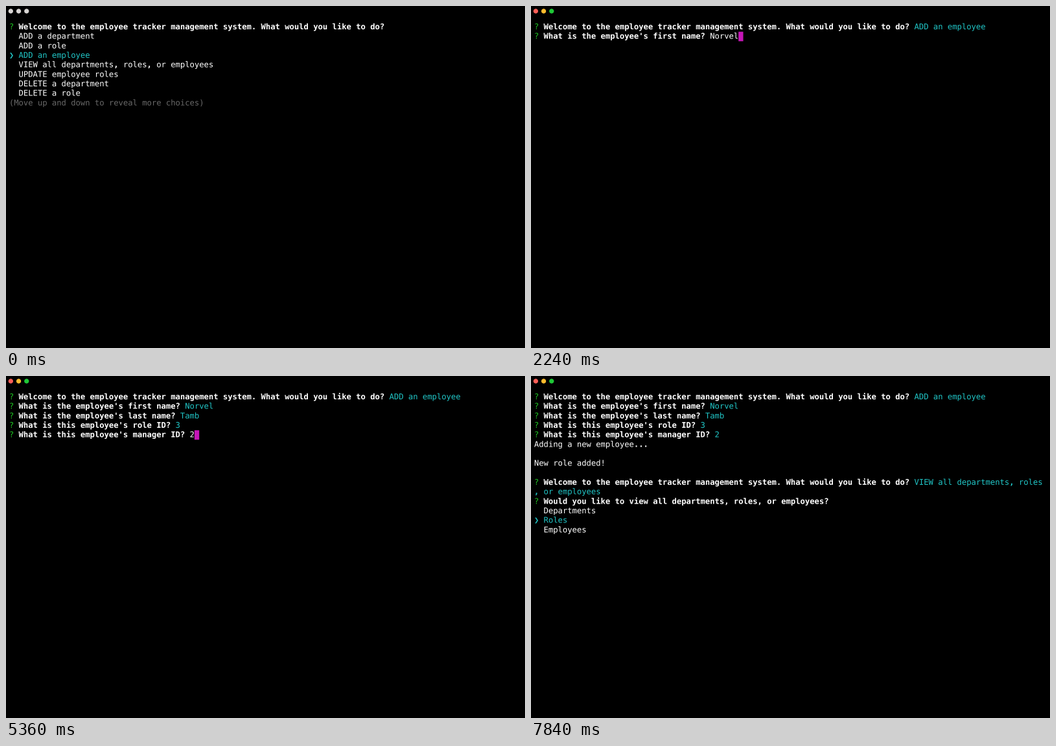
These frames come from a looping animation (801x528 px, 8000 ms). An HTML page with a canvas:

```html
<!DOCTYPE html>
<html lang="en">
<head>
<meta charset="utf-8">
<title>Employee tracker terminal</title>
<style>
  html, body { margin: 0; width: 100%; height: 100%; overflow: hidden; background: #000; }
  canvas { display: block; width: 801px; height: 528px; }
</style>
</head>
<body>
<canvas id="terminal" width="1602" height="1056"></canvas>
<script>
const LOOP = 8000;
const FOCUS_TIME = 80;
const COLUMNS = 107;

// Window units; the window is shown at 11/18 size on a double-density canvas.
const SCALE = 2 * 11 / 18;
const LEFT = 8, TOP = 41, CELL = 12, ROW = 24, BASELINE = 18;
const FONT = '20px "DejaVu Sans Mono", "Liberation Mono", monospace';

const COLORS = {
  text: '#fff', bold: '#fff', mark: '#1dc121', pick: '#20c5c6', hint: '#686868',
  cursor: '#c616b7'
};
const FOCUSED = ['#ff5f57', '#febc2e', '#1fc937'];
const UNFOCUSED = Array(3).fill('#d8d5d3');

const WELCOME = 'Welcome to the employee tracker management system. What would you like to do?';
const VIEW_QUESTION = 'Would you like to view all departments, roles, or employees?';
const ACTIONS = [
  'ADD a department', 'ADD a role', 'ADD an employee',
  'VIEW all departments, roles, or employees', 'UPDATE employee roles',
  'DELETE a department', 'DELETE a role'
];
const TABLES = ['Departments', 'Roles', 'Employees'];
const FIELDS = [
  ["What is the employee's first name?", 'Norvel'],
  ["What is the employee's last name?", 'Tamb'],
  ["What is this employee's role ID?", '3'],
  ["What is this employee's manager ID?", '2']
];

// A line is a list of [style, text] runs.
const plain = text => [['text', text]];
const ask = (question, style = 'text', answer = '') =>
  [['mark', '? '], ['bold', question + ' '], [style, answer]];

function menu(question, items, selected, { hint = false, more = false } = {}) {
  const lines = [ask(question, 'hint', hint ? '(Use arrow keys)' : '')];
  items.forEach((item, i) =>
    lines.push(i === selected ? [['pick', '❯ ' + item]] : plain('  ' + item)));
  if (more) lines.push([['hint', '(Move up and down to reveal more choices)']]);
  return lines;
}

const mainMenu = (selected, hint) => menu(WELCOME, ACTIONS, selected, { hint, more: true });
const answered = count => [
  ask(WELCOME, 'pick', ACTIONS[2]),
  ...FIELDS.slice(0, count).map(([question, answer]) => ask(question, 'pick', answer))
];
const saved = () => [
  ...answered(FIELDS.length),
  plain('Adding a new employee...'), [], plain('New role added!'), []
];

// Screens
const typing = (field, length) => ({
  lines: [...answered(field), ask(FIELDS[field][0], 'text', FIELDS[field][1].slice(0, length))],
  cursor: true
});
const choosing = (selected, hint) => ({ lines: [...saved(), ...mainMenu(selected, hint)] });
function viewing(selected, hint) {
  const room = COLUMNS - WELCOME.length - 3;
  const choice = ACTIONS[3];
  return {
    lines: [
      ...saved(),
      ask(WELCOME, 'pick', choice.slice(0, room)),
      [['pick', choice.slice(room)]],
      ...menu(VIEW_QUESTION, TABLES, selected, { hint })
    ]
  };
}

const STEPS = [
  [0, { lines: mainMenu(2) }],
  [640, typing(0, 0)],
  [1600, typing(0, 1)],
  [1760, typing(0, 2)],
  [1920, typing(0, 3)],
  [2080, typing(0, 5)],
  [2240, typing(0, 6)],
  [2480, typing(1, 0)],
  [2720, typing(1, 1)],
  [2880, typing(1, 2)],
  [3040, typing(1, 4)],
  [3360, typing(2, 0)],
  [4320, typing(2, 1)],
  [4480, typing(3, 0)],
  [5360, typing(3, 1)],
  [5520, choosing(0, true)],
  [6480, choosing(1)],
  [6720, choosing(2)],
  [6880, choosing(3)],
  [7120, viewing(0, true)],
  [7840, viewing(1)]
];

const canvas = document.getElementById('terminal');
const ctx = canvas.getContext('2d', { alpha: false });
ctx.scale(SCALE, SCALE);
ctx.textRendering = 'geometricPrecision';

function drawDots(colors) {
  colors.forEach((color, i) => {
    ctx.fillStyle = color;
    ctx.beginPath();
    ctx.arc(12 + 20 * i, 13, 6, 0, 2 * Math.PI);
    ctx.fill();
  });
}

// Draws one line on the character grid and returns the column after it.
function drawLine(runs, top) {
  let column = 0;
  for (const [style, text] of runs) {
    ctx.fillStyle = COLORS[style];
    for (const char of text) {
      // Full stops and commas are heavy in every weight.
      const heavy = style === 'bold' || '.,'.includes(char);
      ctx.font = heavy ? 'bold ' + FONT : FONT;
      ctx.fillText(char, LEFT + CELL * column++, top + BASELINE);
    }
  }
  return column;
}

function draw({ lines, cursor }, focused) {
  ctx.fillStyle = '#000';
  ctx.fillRect(0, 0, canvas.width, canvas.height);
  drawDots(focused ? FOCUSED : UNFOCUSED);
  lines.forEach((runs, row) => {
    const top = TOP + ROW * row;
    const end = drawLine(runs, top);
    if (cursor && row === lines.length - 1) {
      ctx.fillStyle = COLORS.cursor;
      ctx.fillRect(LEFT + CELL * end, top, CELL, ROW);
    }
  });
}

const start = performance.now();
let shown = '';

function frame() {
  const time = (performance.now() - start) % LOOP;
  const focused = time >= FOCUS_TIME;
  const step = STEPS.findLastIndex(([at]) => at <= time);
  const state = step + ' ' + focused;
  if (state !== shown) {
    draw(STEPS[step][1], focused);
    shown = state;
  }
  requestAnimationFrame(frame);
}
frame();
</script>
</body>
</html>
```
